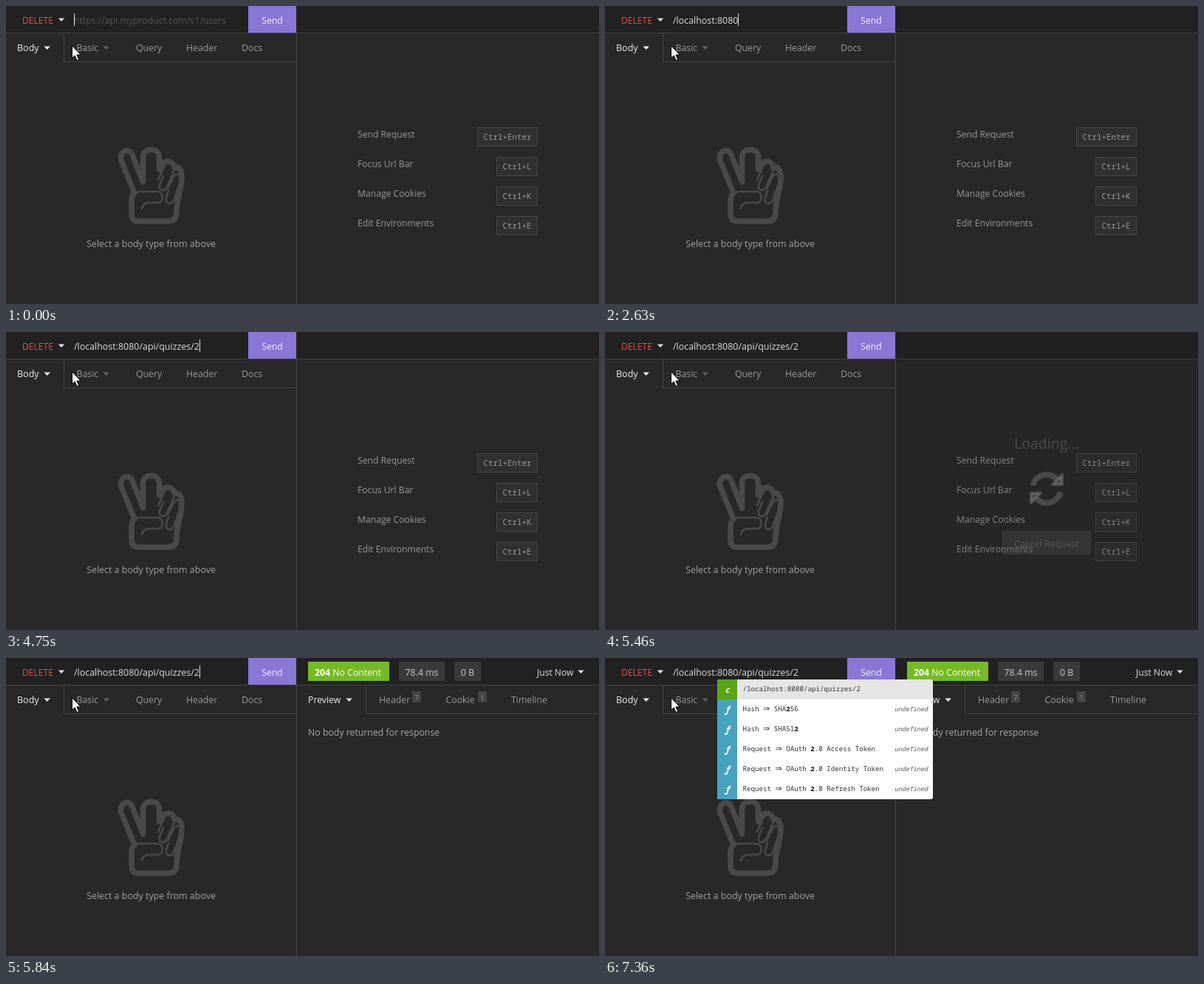
Write an HTML page with a canvas that moves like this. It is 803 by 403 pixels and loops after 7.63 s.

```html
<!DOCTYPE html>
<html lang="en">
<head>
<meta charset="utf-8">
<title>REST client: DELETE request</title>
<style>
  html, body { margin: 0; width: 100%; height: 100%; overflow: hidden; background: #282828; }
  canvas { display: block; }
</style>
</head>
<body>
<canvas id="stage" width="803" height="403"></canvas>
<script>
const ctx = document.getElementById('stage').getContext('2d');
const LOOP = 7630;
const SANS = '"Open Sans", "Noto Sans", sans-serif';
const MONO = '"Noto Sans Mono", "DejaVu Sans Mono", monospace';
const LINE = '#454545', DIM = '#999', BRIGHT = '#e0e0e0';

const URL_TEXT = '/localhost:8080/api/quizzes/2';
const SEND = 5460, DONE = 5840, POPUP = 5940;

// Typing bursts: first key, last key, number of keys.
const keyTimes = [
  [710, 710, 1], [920, 1320, 5], [1530, 1530, 1], [1670, 1740, 2], [1910, 1910, 1],
  [2180, 2180, 1], [2420, 2630, 4], [2910, 2910, 1], [3080, 3150, 2], [3320, 3320, 1],
  [3530, 3530, 1], [3700, 3910, 3], [4080, 4370, 4], [4540, 4540, 1], [4750, 4750, 1]
].flatMap(([from, to, n]) =>
  Array.from({ length: n }, (_, i) => n > 1 ? from + (to - from) * i / (n - 1) : from));

const caretGaps = [[5290, 5810], [6310, 6820], [7360, LOOP]];

function rect(x, y, w, h, color) {
  ctx.fillStyle = color;
  ctx.fillRect(x, y, w, h);
}

function roundRect(x, y, w, h, r, color) {
  ctx.fillStyle = color;
  ctx.beginPath();
  ctx.roundRect(x, y, w, h, r);
  ctx.fill();
}

function text(str, x, y, color, size = 12.3, { family = SANS, style = '', align = 'left' } = {}) {
  ctx.font = `${style} ${size}px ${family}`;
  ctx.fillStyle = color;
  ctx.textAlign = align;
  ctx.fillText(str, x, y);
  return ctx.measureText(str).width;
}

function poly(points, color) {
  ctx.fillStyle = color;
  ctx.beginPath();
  points.forEach(([x, y]) => ctx.lineTo(x, y));
  ctx.closePath();
  ctx.fill();
}

function arrowDown(x, y, color) {
  poly([[x, y], [x + 8.4, y], [x + 4.2, y + 4.6]], color);
}

const handOutline = new Path2D(
  'M174 253L156 209C152 197 167 190 171 201L185.500 238V204C185.500 191 207.500 191 207.500 204V221' +
  'C211 207 226 207 228 218C234 217 238 222 238 230C238 250 231 260 231 278' +
  'Q231 291 220 291H179Q170 291 170 281V263Q170 256 174 253');
const handDetails = new Path2D(
  'M206 235L214 217C219 208 231 213 228 222L218 245C214 252 206 249 208 242L213 230' +
  'M219 247L227 231C231 223 239 229 236 237L228 261C225 270 215 268 217 260L220 250' +
  'M172 258Q174 251 182 251H205C214 251 214 266 205 266H195Q185 266 184 274');

function hand() {
  ctx.strokeStyle = '#494949';
  ctx.lineJoin = ctx.lineCap = 'round';
  ctx.lineWidth = 7.5;
  ctx.stroke(handOutline);
  ctx.lineWidth = 2.6;
  ctx.stroke(handDetails);
}

function requestPane(t) {
  rect(0, 0, 393, 36, '#212121');
  text('DELETE', 22, 24, '#e05252', 12.1);
  arrowDown(70.8, 16.5, BRIGHT);

  const typed = URL_TEXT.slice(0, keyTimes.filter(k => k <= t).length);
  const width = text(typed, 92, 23.5, '#ddd', 12.45);
  if (!typed) text('https://api.myproduct.com/v1/users', 92, 23.5, '#565656', 12.25);
  if (!caretGaps.some(([a, b]) => t >= a && t < b)) rect(Math.round(92 + width), 10, 1, 17, '#ddd');

  rect(328, 0, 65, 36, '#8877d5');
  text('Send', 360.5, 24, '#f2f2f2', 12.3, { align: 'center' });

  text('Body', 15, 61, '#eee', 12.5);
  arrowDown(51.5, 54.5, '#eee');
  text('Basic', 95.5, 61, DIM);
  arrowDown(131.5, 54.5, '#626262');
  text('Query', 176, 61, DIM);
  text('Header', 244, 61, DIM);
  text('Docs', 319, 61, DIM);
  rect(78, 37, 1, 39, LINE);
  rect(78, 75, 315, 1, LINE);

  hand();
  text('Select a body type from above', 196.5, 326, '#a2a2a2', 12.45, { align: 'center' });
}

function shortcuts() {
  const rows = [['Send Request', 'Ctrl+Enter', 638], ['Focus Url Bar', 'Ctrl+L', 664],
    ['Manage Cookies', 'Ctrl+K', 664], ['Edit Environments', 'Ctrl+E', 664]];
  rows.forEach(([label, keys, x], i) => {
    const y = 164 + i * 40;
    text(label, 476, y + 14, DIM, 12.15);
    rect(x, y, 720 - x, 26, LINE);
    rect(x + 1, y + 1, 718 - x, 24, '#303030');
    text(keys, x + 8.5, y + 17, DIM, 10.85, { family: MONO });
  });
}

// Two arc arrows in a 1536-unit box, one turn per 2 s.
function spinner(elapsed) {
  ctx.save();
  ctx.translate(598, 212);
  ctx.scale(0.03, 0.03);
  ctx.rotate(elapsed / 2000 * Math.PI * 2);
  ctx.strokeStyle = ctx.fillStyle = '#ddd';
  ctx.lineCap = 'butt';
  ctx.lineJoin = 'round';
  for (let i = 0; i < 2; i++) {
    ctx.lineWidth = 256;
    ctx.beginPath();
    ctx.arc(0, 0, 640, Math.PI * 1.08, Math.PI * 1.76);
    ctx.stroke();
    ctx.lineWidth = 128;
    ctx.beginPath();
    ctx.moveTo(704, -640);
    ctx.lineTo(704, -192);
    ctx.lineTo(256, -192);
    ctx.closePath();
    ctx.fill();
    ctx.stroke();
    ctx.rotate(Math.PI);
  }
  ctx.restore();
}

function loading(t) {
  const elapsed = Math.floor((t - SEND) / 31.6) * 31.6;
  ctx.globalAlpha = Math.min(1, (elapsed + 32) / 160);
  rect(394, 0, 408, 403, 'rgba(30,30,30,.8)');
  text('Loading...', 598, 158, '#ddd', 19.5, { align: 'center' });
  spinner(elapsed);
  roundRect(538, 269, 120, 32, 3, '#858585');
  roundRect(539, 270, 118, 30, 2, '#202020');
  text('Cancel Request', 598, 291, '#ddd', 12.3, { align: 'center' });
  ctx.globalAlpha = 1;
}

function badge(x, label) {
  roundRect(x, 45, 12, 15, 2, '#444');
  text(label, x + 6, 56.5, DIM, 9, { align: 'center' });
}

function response() {
  rect(409, 5, 110, 26, '#75ba24');
  const w = text('204', 418, 24, '#fff', 12.3, { style: 'bold' });
  text(' No Content', 418 + w, 24, '#fff');
  rect(532, 5, 62, 26, '#3a3a3a');
  text('78.4 ms', 563, 24, '#ccc', 12.3, { align: 'center' });
  rect(607, 5, 36, 26, '#3a3a3a');
  text('0 B', 625, 24, '#ccc', 12.3, { align: 'center' });
  text('Just Now', 719, 23.5, '#ddd', 12.1);
  arrowDown(774.3, 16.5, '#ddd');

  text('Preview', 409, 61, '#eee');
  arrowDown(460.5, 54.5, '#eee');
  rect(487, 37, 1, 39, LINE);
  rect(487, 75, 315, 1, LINE);
  text('Header', 505, 61, DIM);
  badge(550, '7');
  text('Cookie', 595.5, 61, DIM);
  badge(639, '1');
  text('Timeline', 684, 61, DIM);
  text('No body returned for response', 409, 105, '#a8a8a8');
}

// Monospaced run with the matched "2" in bold.
function matched(str, x, y) {
  str.split(/(2)/).forEach(part => {
    const bold = part === '2';
    x += text(part, x, y, bold ? '#000' : '#333', 9.17, { family: MONO, style: bold ? 'bold' : '' });
  });
}

function popup() {
  const rows = [['Hash', 'SHA256'], ['Hash', 'SHA512'], ['Request', 'OAuth 2.0 Access Token'],
    ['Request', 'OAuth 2.0 Identity Token'], ['Request', 'OAuth 2.0 Refresh Token']];
  const icon = { family: MONO, style: 'italic bold', align: 'center' };
  ctx.save();
  ctx.beginPath();
  ctx.roundRect(152, 29, 292, 162, 3);
  ctx.clip();
  rect(152, 29, 292, 162, '#fff');
  rect(152, 29, 292, 27, '#e5e5e5');
  rect(152, 29, 27, 27, '#58a515');
  rect(152, 56, 27, 135, '#46a3c0');
  text('c', 165.5, 46.5, '#fff', 11, icon);
  text(URL_TEXT, 186.5, 45, '#333', 9.17, { family: MONO });
  rows.forEach(([group, name], i) => {
    const y = 72 + i * 27;
    text('ƒ', 165.5, y + 2, '#fff', 12, icon);
    const arrowX = 186.5 + text(group + ' ', 186.5, y, '#333', 9.17, { family: MONO });
    text('⇒', arrowX, y, '#333', 11, { family: '"DejaVu Sans", sans-serif' });
    matched(name, arrowX + 14.8, y);
    text('undefined', 437, y, '#555', 8.35, { family: MONO, style: 'italic', align: 'right' });
  });
  ctx.restore();
}

function pointer() {
  const shape = [[0, 0], [0, 16.5], [3.7, 13], [6.6, 19.5], [9.2, 18.4], [6.4, 12], [11.5, 12]];
  const points = shape.map(([x, y]) => [x + 89.5, y + 54]);
  poly(points, '#fff');
  ctx.strokeStyle = '#000';
  ctx.lineWidth = 1;
  ctx.lineJoin = 'miter';
  ctx.stroke();
}

function draw(t) {
  rect(0, 0, 803, 403, '#282828');
  rect(394, 0, 409, 36, '#212121');
  rect(0, 36, 803, 1, LINE);
  requestPane(t);
  if (t < DONE) shortcuts();
  else response();
  if (t >= SEND && t < DONE) loading(t);
  rect(393, 36, 1, 367, LINE);
  rect(802, 0, 1, 403, '#1e1e1e');
  if (t >= POPUP) popup();
  pointer();
}

const start = performance.now();
function tick() {
  draw((performance.now() - start) % LOOP);
  requestAnimationFrame(tick);
}
tick();
</script>
</body>
</html>
```
